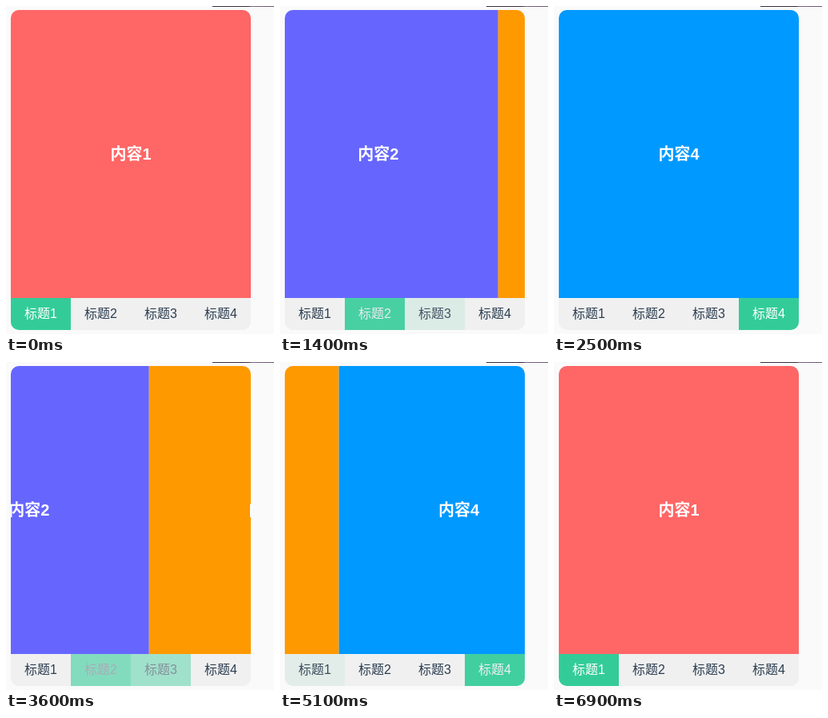
Write an HTML page that moves like this. It is 335 by 410 pixels and loops after 8700 ms.

```html
<!DOCTYPE html>
<html lang="zh">
<head>
<meta charset="utf-8">
<title>Tabs</title>
<style>
  html, body { margin: 0; width: 100%; height: 100%; overflow: hidden; }
  body {
    position: relative;
    background: #fafafa;
    font: 16px "Liberation Sans", "Noto Sans CJK SC", "Noto Sans CJK", sans-serif;
    text-align: center;
  }
  .edge {
    position: absolute;
    left: 258px;
    top: 0;
    width: 77px;
    height: 1px;
    background: linear-gradient(90deg, #3b2f42 0 58%, #7d6484 64%, #6b5572);
  }
  .card {
    position: absolute;
    left: 6px;
    top: 5px;
    width: 300px;
    height: 400px;
    border-radius: 10px;
    overflow: hidden;
  }
  .strip { display: flex; width: 1200px; height: 360px; }
  .panel {
    width: 300px;
    color: #fff;
    font-size: 20px;
    font-weight: bold;
    line-height: 360px;
  }
  .tabs { display: flex; height: 40px; }
  .tab {
    --on: 0%;
    width: 75px;
    line-height: 40px;
    color: color-mix(in srgb, #fff var(--on), #2c3e50);
    background: color-mix(in srgb, #33cc99 var(--on), #f0f0f0);
  }
</style>
</head>
<body>
<div class="edge"></div>
<div class="card">
  <div class="strip">
    <div class="panel" style="background:#ff6666">内容1</div>
    <div class="panel" style="background:#6666ff">内容2</div>
    <div class="panel" style="background:#ff9900">内容3</div>
    <div class="panel" style="background:#0099ff">内容4</div>
  </div>
  <div class="tabs">
    <div class="tab">标题1</div>
    <div class="tab">标题2</div>
    <div class="tab">标题3</div>
    <div class="tab">标题4</div>
  </div>
</div>
<script>
  const LOOP = 8700, TICK = 100, DURATION = 300;
  const strip = document.querySelector('.strip');
  const tabs = document.querySelectorAll('.tab');

  // [click time in ms, panel selected]
  const clicks = [
    [667, 1], [1367, 2], [2200, 3], [3000, 2], [3500, 1],
    [4067, 0], [4900, 3], [5900, 1], [6567, 0]
  ];

  // CSS "ease": cubic-bezier(.25, .1, .25, 1)
  const bezier = (s, a, b) => 3 * (1 - s) ** 2 * s * a + 3 * (1 - s) * s * s * b + s ** 3;
  function ease(x) {
    if (x <= 0) return 0;
    if (x >= 1) return 1;
    let low = 0, high = 1;
    for (let i = 0; i < 24; i++) {
      const mid = (low + high) / 2;
      if (bezier(mid, 0.25, 0.25) < x) low = mid; else high = mid;
    }
    return bezier(low, 0.1, 1);
  }

  function draw(time) {
    let from = 0, to = 0, start = -DURATION;
    for (const [at, panel] of clicks) {
      if (at > time) break;
      from = to;
      to = panel;
      start = at;
    }
    const p = ease((time - start) / DURATION);
    strip.style.transform = `translateX(${-300 * (from + (to - from) * p)}px)`;
    tabs.forEach((tab, i) => {
      const on = i === to ? (from === to ? 1 : p) : i === from ? 1 - p : 0;
      tab.style.setProperty('--on', `${(on * 100).toFixed(2)}%`);
    });
  }

  // The picture advances ten times a second.
  function frame(now) {
    draw(Math.floor((now + 1) / TICK) * TICK % LOOP);
    requestAnimationFrame(frame);
  }
  draw(0);
  requestAnimationFrame(frame);
</script>
</body>
</html>
```
